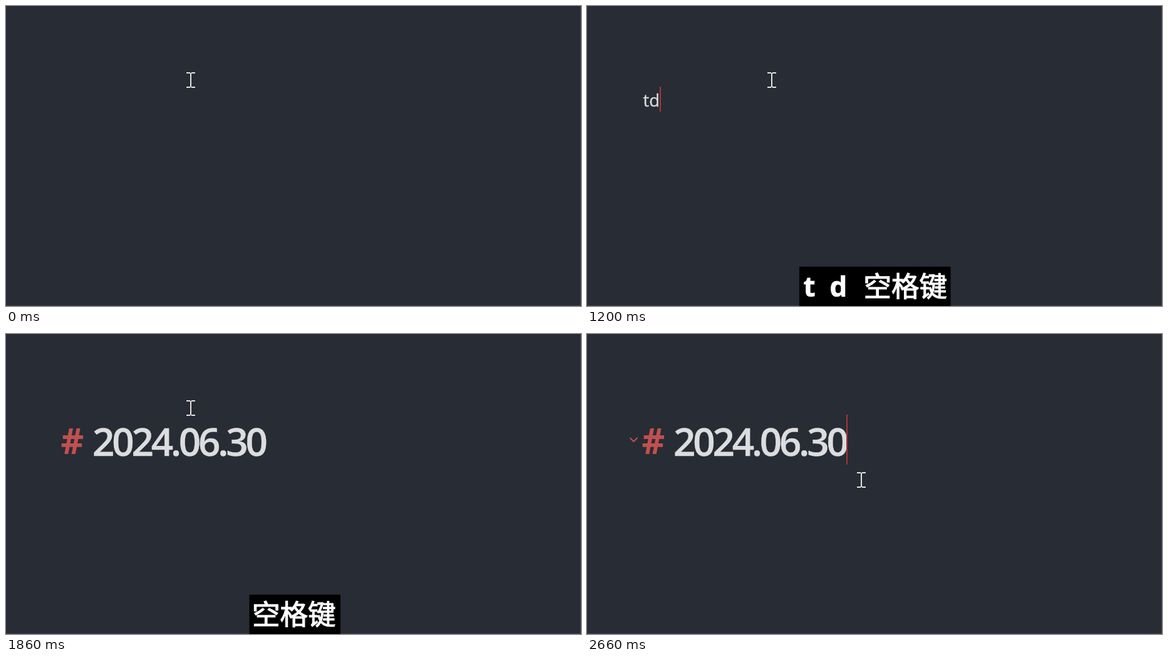
An HTML page that plays this animation: 918 px wide and 480 px high, repeating every 2730 ms.

```html
<!DOCTYPE html>
<html lang="zh">
<head>
<meta charset="utf-8">
<title>Date shortcut</title>
<style>
  html, body { margin: 0; width: 100%; height: 100%; overflow: hidden; background: #282c34; }
  svg { display: block; width: 100%; height: 100%; }
  text { font-family: "Open Sans", "Noto Sans", sans-serif; white-space: pre; }
  .typed { font-size: 27.5px; fill: #dadada; stroke: #dadada; stroke-width: .4px; }
  .hash { font-size: 57px; font-weight: 700; fill: #c0504f; }
  .date { font-size: 62px; font-weight: 600; letter-spacing: -4.15px; fill: #dcdddf; stroke: #dcdddf; stroke-width: .4px; }
  .key { font-size: 44px; font-weight: 700; fill: #fff; stroke: #fff; stroke-width: .7px; }
  .cjk { font-family: "Noto Sans CJK SC", "Noto Sans CJK", sans-serif; font-size: 44.5px; font-weight: 400; stroke-width: 1.2px; }
</style>
</head>
<body>
<svg viewBox="0 0 918 480">
  <rect width="918" height="480" fill="#282c34"/>
  <path d="M917.5 0V480M0 479.5H918" stroke="#43464c"/>
  <text id="typed" class="typed" x="89.5" y="161">td</text>
  <g id="heading">
    <text class="hash" x="87.5" y="192">#</text>
    <text class="date" x="138" y="195">2024.06.30</text>
  </g>
  <path id="fold" d="M68.5 166l6 6l6-6" fill="none" stroke="#c0504f" stroke-width="2"/>
  <rect id="caret" width="2" fill="#a8353a"/>
  <g id="keys">
    <rect id="keyBox" y="417" height="63"/>
    <text id="keyT" class="key" y="465">t</text>
    <text id="keyD" class="key" y="465">d</text>
    <text id="keySpace" class="key cjk" y="464.5">空格键</text>
  </g>
  <path id="pointer" d="M-7-11.5H-1M1-11.5H7M0-11.5V11.5M-7 11.5H-1M1 11.5H7" fill="none" stroke="#e4e2de" stroke-width="2"/>
</svg>
<script>
const LOOP = 2730, BLINK = 530, KEY_LIFE = 920;
const TYPED = 740, EXPAND = 1330, MOVE = 2250;
const $ = id => document.getElementById(id);
const show = (el, on) => el.setAttribute("visibility", on ? "visible" : "hidden");
const set = (el, attrs) => {
  for (const name in attrs) el.setAttribute(name, attrs[name]);
};

// Key overlay layouts: box left, box width, then text x for each visible key.
const layouts = {
  t: [444, 30, { keyT: 450.5 }],
  td: [418.5, 81, { keyT: 425, keyD: 467 }],
  tds: [339, 241.5, { keyT: 345.5, keyD: 387.5, keySpace: 441.5 }],
  ds: [360, 199.5, { keyD: 366.5, keySpace: 420.5 }],
  s: [388.5, 145.5, { keySpace: 393 }]
};
const presses = { t: 470, d: 540, s: 1200 };

function drawKeys(t) {
  const held = Object.keys(presses)
    .filter(k => t >= presses[k] && t < presses[k] + KEY_LIFE).join("");
  const [x, width, places] = layouts[held] || [0, 0, {}];
  show($("keyBox"), held);
  set($("keyBox"), { x, width });
  for (const id of ["keyT", "keyD", "keySpace"]) {
    show($(id), id in places);
    if (id in places) set($(id), { x: places[id] });
  }
}

function drawCaret(t) {
  const [x, y, height] = t < TYPED ? [89, 128, 35]
    : t < EXPAND ? [116, 129, 40] : [414, 129, 80];
  set($("caret"), { x, y, height });
  show($("caret"), t >= 70 && (t < EXPAND || Math.floor((t - EXPAND) / BLINK) % 2 === 0));
}

// The pointer is sampled every 70 ms and speeds up, then flicks downwards.
function pointerAt(t) {
  if (t >= 2660) return [438, 233.5];
  if (t < MOVE) return [295, 118.5];
  const p = (Math.floor((t - MOVE) / 70) + 1) / 6;
  const e = p * p;
  return [Math.round(295 + 89 * e), 118.5 + Math.round(32 * e)];
}

function draw(t) {
  show($("typed"), t >= TYPED && t < EXPAND);
  show($("heading"), t >= EXPAND);
  drawCaret(t);
  drawKeys(t);
  const [x, y] = pointerAt(t);
  set($("pointer"), { transform: `translate(${x} ${y})` });
  const fade = Math.floor((t - 2390) / 70) / 3;
  set($("fold"), { opacity: Math.max(0, Math.min(1, fade)) });
}

const start = performance.now();
function tick() {
  draw((performance.now() - start) % LOOP);
  requestAnimationFrame(tick);
}
tick();
</script>
</body>
</html>
```
